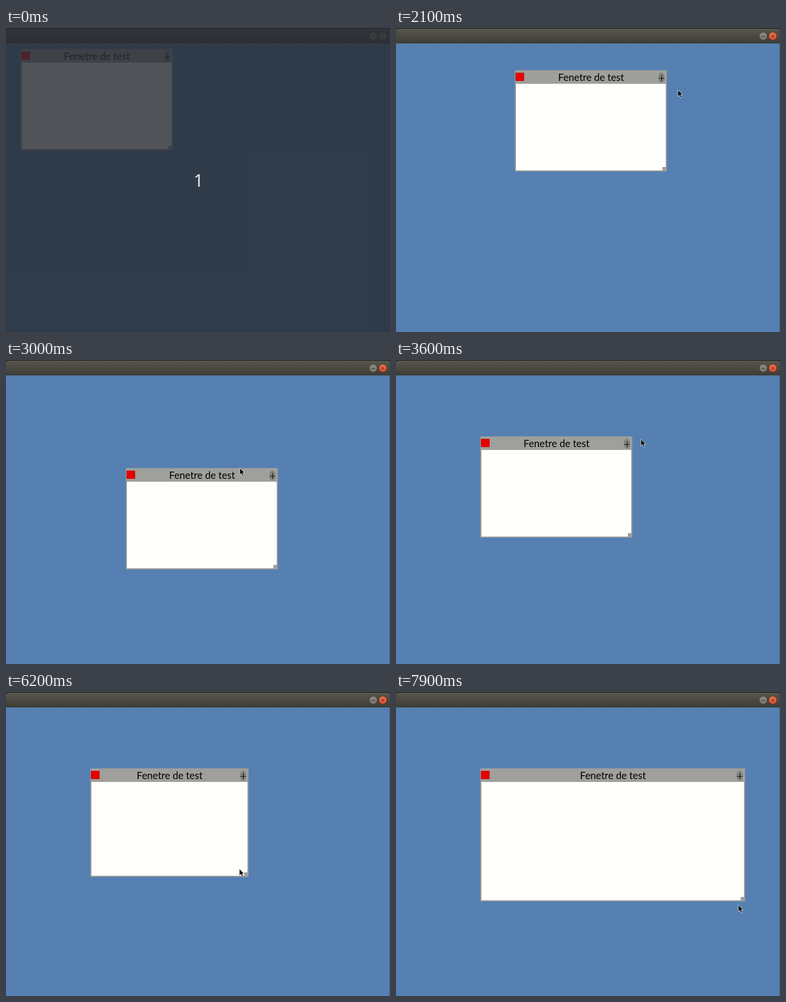
These frames come from a looping animation (800 px wide and 632 px high, 8000 ms). An HTML page:

```html
<!DOCTYPE html>
<html lang="fr">
<head>
<meta charset="utf-8">
<title>Fenetre de test</title>
<style>
  html, body { margin: 0; width: 100%; height: 100%; overflow: hidden; background: #5580b1; }
  svg { display: block; }
  #title { font: 20.7px Lato, sans-serif; text-anchor: middle; }
  #count { font: 36px "Noto Sans", "Open Sans", sans-serif; text-anchor: middle; fill: #e0e9ee; }
</style>
</head>
<body>
<svg width="800" height="632" viewBox="0 0 800 632">
  <defs>
    <linearGradient id="bar" x2="0" y2="1">
      <stop offset="0" stop-color="#58574d"/>
      <stop offset="1" stop-color="#3d3c36"/>
    </linearGradient>
    <linearGradient id="red" x2="0" y2="1">
      <stop offset="0" stop-color="#f0714b"/>
      <stop offset="1" stop-color="#d8482a"/>
    </linearGradient>
    <linearGradient id="grey" x2="0" y2="1">
      <stop offset="0" stop-color="#8d8b82"/>
      <stop offset="1" stop-color="#74736b"/>
    </linearGradient>
  </defs>

  <rect width="800" height="632" fill="#5580b1"/>
  <path d="M799.5 32V632" stroke="#3c5a7e"/>
  <rect width="800" height="32" fill="#2d2c28"/>
  <path d="M0 32V7Q0 2 5 2H795Q800 2 800 7V32Z" fill="url(#bar)"/>
  <path d="M5 2.5H795" stroke="#67665c"/>
  <path d="M0 31.5H800" stroke="#393832"/>
  <g stroke="#33322d">
    <circle cx="765" cy="17" r="8.5" fill="url(#grey)"/>
    <circle id="close" cx="785" cy="17" r="8.5" fill="url(#red)"/>
    <path d="M761 17.5H769M782.5 14.5L787.5 19.5M787.5 14.5L782.5 19.5" fill="none"/>
  </g>

  <g id="win">
    <rect id="frame" x="-.3" y="-.3" fill="#9f9f9b"/>
    <rect id="body" x="2" y="28" fill="#fffffb"/>
    <rect id="grip" width="8" height="8" fill="#9f9f9b"/>
    <rect x="1.5" y="5.5" width="17" height="16" fill="#e80000" stroke="#c80000"/>
    <text id="title" y="22">Fenetre de test</text>
    <g id="plus">
      <ellipse cy="15" rx="6.5" ry="10.5" fill="#81827e"/>
      <path d="M-6 16.5H6M.5 10V22" stroke="#000" stroke-width="1.2"/>
    </g>
  </g>

  <path id="cursor" d="M.2 .7V14.6L3.4 11.7 5.8 17 8.2 16 5.9 10.8H10.2Z" stroke="#fff" stroke-width=".8"/>

  <g id="veil">
    <rect width="800" height="632" fill="#282c33" fill-opacity=".81"/>
    <text id="count" x="401" y="330">1</text>
  </g>
</svg>
<script>
const LOOP = 8000, STEP = 100, LEAD = 70;
const GRAB = 1400, DROP = 3400, HOVER = 4800, RESIZE = 5800;
const $ = id => document.getElementById(id);
const set = (id, attrs) => {
  for (const key in attrs) $(id).setAttribute(key, attrs[key]);
};
const move = (id, x, y) => set(id, { transform: `translate(${x} ${y})` });
const show = (id, on) => set(id, { visibility: on ? "visible" : "hidden" });

// Turning points of each gesture: [time, x, y]
const drag = [
  [1300, 31, 44], [1400, 4, 37], [1500, 43, 45], [1700, 470, 270],
  [1900, 180, 300], [2100, 248, 88], [2250, 438, 150], [2400, 410, 345],
  [2600, 297, 221], [2700, 97, 140], [3000, 250, 225], [DROP, 176, 159]
];
const stretch = [
  [5700, 492, 369], [6000, 560, 411], [6350, 464, 363], [6600, 642, 528],
  [7000, 515, 430], [7400, 675, 515], [7850, 737, 425], [LOOP, 707, 455]
];
const enter = [[700, 299, 15], [1000, 288, 54], [1100, 288, 54], [1200, 281, 54]];
const roam = [
  [DROP, 426, 170], [3600, 510, 164], [3900, 494, 481],
  [4000, 494, 481], [4300, 456, 430], [4700, 493, 363]
];

function at(track, t) {
  const next = track.findIndex(p => p[0] > t);
  const b = track.at(next), a = next > 0 ? track[next - 1] : b;
  const k = (t - a[0]) / (b[0] - a[0] || 1);
  return a === b || next < 0 ? b.slice(1) : [1, 2].map(n => Math.round(a[n] + (b[n] - a[n]) * k));
}

// While pulling, the pointer runs ahead of the window.
function pointer(t) {
  const pull = (track, dx, dy) => {
    const [x, y] = at(track, t + LEAD);
    return [x + dx, y + dy];
  };
  if (t < GRAB) return at(enter, t);
  if (t < DROP) return pull(drag, 250, 11);
  if (t < HOVER) return at(roam, t);
  if (t < RESIZE) return [492 + Math.round(81 * Math.sin(Math.PI * (t - HOVER) / 900)), 364];
  return pull(stretch, 0, -7);
}

function draw() {
  const t = Math.floor(performance.now() % LOOP / STEP) * STEP;
  const dim = t < 300;
  const [right, bottom] = at(stretch, t);
  const w = 316 + right - stretch[0][1], h = 210 + bottom - stretch[0][2];

  move("win", ...at(drag, t));
  set("frame", { width: w + .6, height: h + .6 });
  set("body", { width: w - 4, height: h - 30 });
  set("grip", { x: w - 9, y: h - 9 });
  set("title", { x: w / 2 + .5 });
  move("plus", w - 11, 0);
  move("cursor", ...pointer(t));
  show("cursor", !dim);
  show("veil", dim);
  set("close", { fill: dim ? "url(#grey)" : "url(#red)" });
  requestAnimationFrame(draw);
}
draw();
</script>
</body>
</html>
```
